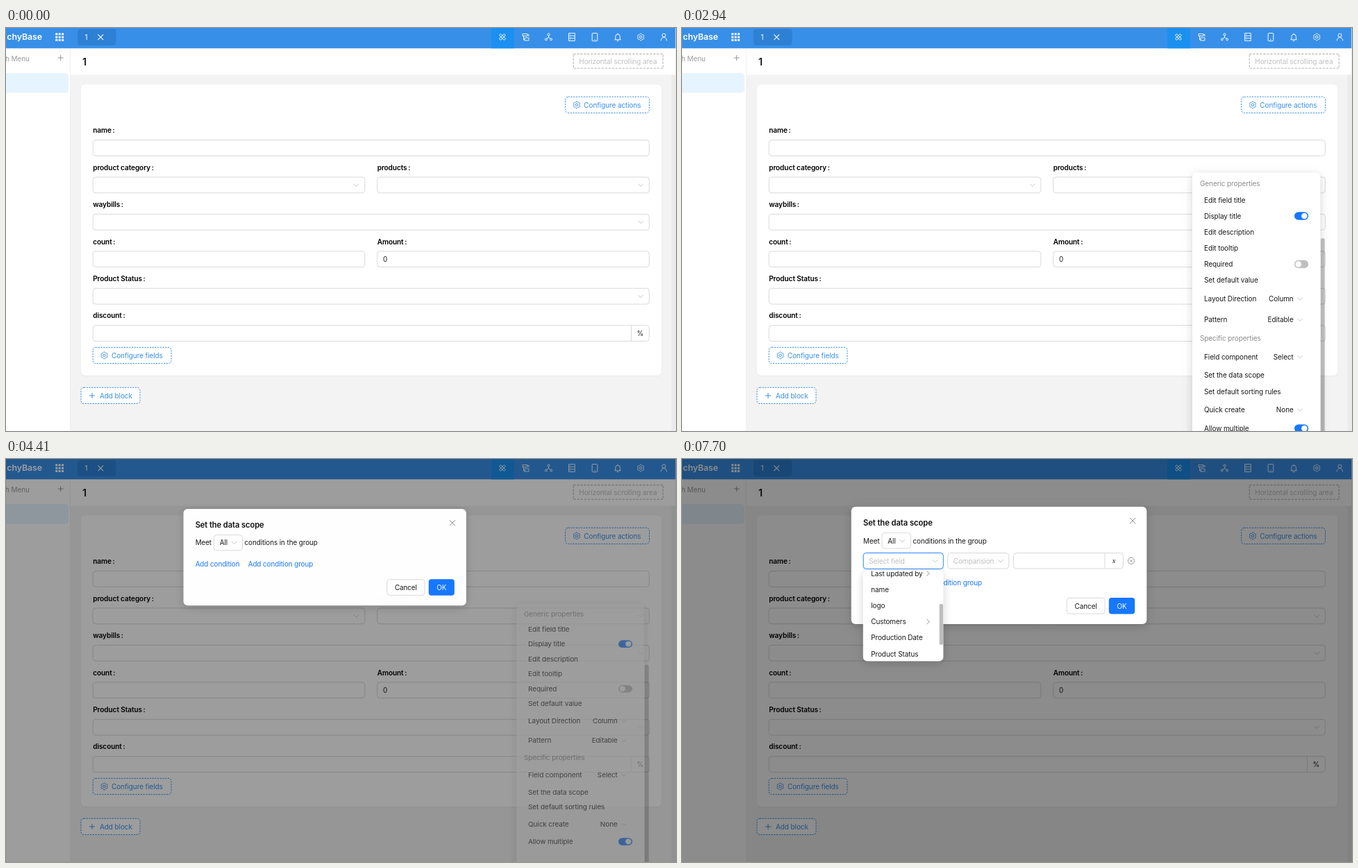
Animation, 965 px wide and 581 px high, one loop 8000 ms. Source, as an HTML page:

```html
<!DOCTYPE html>
<html lang="en">
<head>
<meta charset="utf-8">
<title>Form block data scope</title>
<style>
  html, body { margin: 0; width: 100%; height: 100%; overflow: hidden; background: #fff; }
  svg { display: block; width: 965px; height: 581px; }
  text { font-family: Inter, "Open Sans", sans-serif; letter-spacing: -0.1px; white-space: pre; }
  .card { filter: drop-shadow(0 1px 1px rgba(0,0,0,.04)); }
  .popup { filter: drop-shadow(0 3px 6px rgba(0,0,0,.11)) drop-shadow(0 2px 8px rgba(0,0,0,.07)); }
</style>
</head>
<body>
<svg id="stage" viewBox="0 0 965 581" xmlns="http://www.w3.org/2000/svg"></svg>
<script>
const INK = '#1a1a1a', BLUE = '#388fe8', TAG = '#2490f5', LINE = '#d9d9d9',
      MUTE = '#bfbfbf', PRIMARY = '#1677ff', HOVER = '#f4f4f4';

// ---- drawing helpers: each returns SVG markup ----
const box = (x, y, w, h, fill, r = 0, more = '') =>
  `<rect x="${x}" y="${y}" width="${w}" height="${h}" rx="${r}" fill="${fill}" ${more}/>`;
const frame = (x, y, w, h, stroke = LINE, r = 4, fill = '#fff', more = '') =>
  box(x, y, w, h, fill, r, `stroke="${stroke}" ${more}`);
const line = (d, stroke, w = 1, more = '') =>
  `<path d="${d}" fill="none" stroke="${stroke}" stroke-width="${w}" ${more}/>`;
const ring = (x, y, r, stroke, w = 1) =>
  `<circle cx="${x}" cy="${y}" r="${r}" fill="none" stroke="${stroke}" stroke-width="${w}"/>`;
// y is the middle of the capitals
const text = (x, y, s, fill = INK, size = 10, more = '') =>
  `<text x="${x}" y="${(y + size * .36).toFixed(2)}" fill="${fill}" font-size="${size}" ${more}>${s}</text>`;
const group = (id, body, more = '') => `<g id="${id}" ${more}>${body}</g>`;

const down = (x, y, s = 3.6, c = MUTE) => line(`M${x - s} ${y - s / 2}l${s} ${s}l${s} ${-s}`, c, .9);
const right = (x, y) => line(`M${x - 2} ${y - 3.4}l4 3.4l-4 3.4`, '#8c8c8c', .9);
const cross = (x, y, s, c, w = 1) =>
  line(`M${x - s} ${y - s}l${2 * s} ${2 * s}m0 ${-2 * s}l${-2 * s} ${2 * s}`, c, w);
const plus = (x, y, s, c, w = 1) => line(`M${x - s} ${y}h${2 * s}M${x} ${y - s}v${2 * s}`, c, w);

function gear(x, y, c) {
  let d = '';
  for (let i = 0; i < 36; i++) {
    const a = i * Math.PI / 18, r = 4.5 + .55 * Math.cos(6 * a);
    d += `${i ? 'L' : 'M'}${(x + r * Math.sin(a)).toFixed(2)} ${(y + r * Math.cos(a)).toFixed(2)}`;
  }
  return line(d + 'Z', c, .95) + ring(x, y, 1.8, c, .95);
}

function dashed(x, y, w, label, textX, icon) {
  return frame(x, y, w, 23.2, BLUE, 4, '#fff', 'stroke-dasharray="2.2 1.5"') +
    icon + text(textX, y + 11.7, label, BLUE);
}

// ---- page ----
function headerIcons() {
  const w = '#fff';
  const bar = a => `<rect x="-5" y="-1.5" width="10" height="3" rx=".7" fill="none" stroke="#fff"
    stroke-width=".9" transform="translate(715 13) rotate(${a})"/>`;
  return bar(45) + bar(-45) +
    line('M744 8.5h7v3h-7zM745.500 11.500v5.500h2M747 14h6v4h-6zM751 9.500h2v2.500', w, .9) +
    ring(781.5, 9.5, 1.6, w) + ring(777.8, 16.5, 1.4, w) + ring(785.2, 16.5, 1.4, w) +
    line('M781.500 11v3M778.500 15.300l3-1.600l3 1.600', w, .9) +
    line('M810.500 7.500h8.800v11h-8.800zM810.500 11.200h8.800M810.500 14.800h8.800M812.300 9.400h1M812.300 13h1M812.300 16.600h1', w, .9) +
    frame(844.2, 7.5, 7.6, 11.2, w, 1, 'none') + line('M847.300 16.600h1.400', w) +
    line('M876.600 16.800h9M877.800 16.600v-4a3.300 3.600 0 0 1 6.600 0v4M881.100 8.800v-1.300M879.900 18.600h2.400', w) +
    gear(914.3, 13, w) +
    ring(947.5, 10.5, 2.5, w) + line('M943.300 18.300a4.200 4.800 0 0 1 8.400 0', w);
}

function chrome() {
  let dots = '';
  for (let i = 0; i < 9; i++) dots += box(71.3 + i % 3 * 4.4, 7.3 + (i / 3 | 0) * 4.4, 3, 3, '#fff', .4);
  return box(0, 0, 965, 581, '#f3f3f3') + box(0, 29, 93, 552, '#fff') +
    box(93, 29, 872, 38.5, '#fff') + line('M92.500 29.500V581', '#f0f0f0') +
    box(958.5, 67.5, 6.5, 514, '#ebebeb') +
    box(0, 0, 965, 29.3, BLUE) + box(699, 0, 33, 29.3, '#1b90f1') +
    box(103, 1.5, 55.5, 23.5, '#2d80d4', 4) +
    text(52, 13, 'chyBase', '#fff', 12.4, 'font-weight="600" text-anchor="end"') + dots +
    text(113.5, 13, '1', '#fff') + cross(136.3, 13.2, 3.9, '#fff', 1.1) + headerIcons() +
    line('M964.500 0V67', '#e6e6e6', .8) +
    text(33.8, 44, 'h Menu', '#9c9c9c', 10, 'text-anchor="end"') + plus(78.7, 43, 4, '#8c8c8c', .9) +
    box(-8, 65, 98, 28.6, '#e6f4ff', 5) +
    text(110, 48.4, '1', INK, 14.5, 'font-weight="600"') +
    frame(817.3, 37.5, 129, 20.6, MUTE, 0, '#fff', 'stroke-width="1.3" stroke-dasharray="3.2 1.8"') +
    text(825.3, 47.9, 'Horizontal scrolling area', MUTE);
}

const LEFT = 125.2, MID = 534.7, HALF = 391.7, FULL = 801.2;
const rowY = i => 147.6 + i * 53.45;
const label = (x, i, s) => text(x, rowY(i), `${s}<tspan dx="1.600">:</tspan>`, '#000', 10.1, 'font-weight="600"');
function field(x, w, i, name, select) {
  const y = rowY(i);
  return label(x, i, name) + frame(x, y + 13.9, w, 22.8) +
    (select ? down(x + w - 12.3, y + 25.4) : '');
}

function form() {
  return box(108, 81.5, 836, 419.5, '#fff', 6, 'class="card"') +
    dashed(805.7, 99.2, 120.8, 'Configure actions', 832.3, gear(822, 110.8, BLUE)) +
    field(LEFT, FULL, 0, 'name') +
    field(LEFT, HALF, 1, 'product category', true) + field(MID, HALF, 1, 'products', true) +
    field(LEFT, FULL, 2, 'waybills', true) +
    field(LEFT, HALF, 3, 'count') + field(MID, HALF, 3, 'Amount') + text(543, 333.4, '0') +
    field(LEFT, FULL, 4, 'Product Status', true) +
    field(LEFT, FULL, 5, 'discount') + line('M900.500 428.900v22.500', LINE) +
    text(913.3, 440.2, '%', INK, 10, 'text-anchor="middle"') +
    dashed(125.2, 460.4, 112.8, 'Configure fields', 152, gear(141.5, 472, BLUE)) +
    dashed(108, 518.3, 85, 'Add block', 135, plus(124, 530, 4, BLUE));
}

// ---- designer overlays ----
const tile = (x, y) => box(x - 5.8, y - 5.8, 11.6, 11.6, TAG);
const burger = (x, y) => tile(x, y) +
  line(`M${x - 4} ${y - 3}h8m-8 3h8m-8 3h8`, '#fff', 1.1);
function tools(x, y) {
  return tile(x, y) + plus(x, y, 4, '#fff', .9) +
    line(`M${x - 1} ${y - 3.6}h2M${x - 1} ${y + 3.6}h2M${x - 3.6} ${y - 1}v2M${x + 3.6} ${y - 1}v2`, '#fff', .9) +
    tile(x + 13.7, y) + plus(x + 13.7, y, 3.8, '#fff', 1) + burger(x + 27.3, y);
}
const blockTools = () =>
  box(108.3, 82.3, 835.2, 418, 'none', 0, `stroke="${TAG}" stroke-opacity=".65"`) +
  box(110.5, 84.5, 26.5, 12, TAG) + text(112.8, 90.6, 'order', '#fff', 8.7) +
  tools(908, 90.3) + burger(957, 37);
const fieldTools = () => box(MID, 193.7, HALF, 44, '#1890ff', 3, 'fill-opacity=".06"') + tools(892, 200.4);

// ---- settings menu ----
const MENU = [
  ['Edit field title', 248], ['Display title', 271, true], ['Edit description', 294.2],
  ['Edit tooltip', 317.4], ['Required', 340.5, false], ['Set default value', 363.7],
  ['Layout Direction', 390.5, 'Column'], ['Pattern', 420.7, 'Editable'],
  ['Field component', 474, 'Select'], ['Set the data scope', 500.8],
  ['Set default sorting rules', 524], ['Quick create', 550.7, 'None'], ['Allow multiple', 577.3, true]
];
const toggle = (y, on) => box(882, y - 5.7, 20.2, 11.5, on ? PRIMARY : MUTE, 5.8) +
  `<circle cx="${on ? 896.4 : 887.800}" cy="${y}" r="4.300" fill="#fff"/>`;
function menu() {
  let s = box(735, 208.5, 184.3, 420, '#fff', 6, 'class="popup"') +
    box(920, 303, 5.8, 320, 'rgba(0,0,0,.24)', 3) + box(743, 0, 168, 23.2, HOVER, 3, 'id="pick"') +
    text(746, 224.8, 'Generic properties', '#8c8c8c') + text(746, 447.6, 'Specific properties', '#8c8c8c');
  for (const [name, y, extra] of MENU) {
    s += text(752, y, name);
    if (typeof extra === 'boolean') s += toggle(y, extra);
    if (typeof extra === 'string') s += text(880.7, y, extra, INK, 10, 'text-anchor="end"') + down(890, y, 3.4);
  }
  return s;
}

// ---- dialog ----
function dialog(x, w, bottom, body, first) {
  const r = x + w, l = x + 17.2, by = bottom - 37.7, ly = bottom - 60;
  return box(x, 68.7, w, bottom - 68.7, '#fff', 6, 'class="popup"') +
    text(l, 91.9, 'Set the data scope', '#111', 11.3, 'font-weight="600"') +
    cross(r - 20.2, 89, 4.1, '#8c8c8c') +
    text(l, 118, 'Meet') + frame(x + 44.2, 106.5, 41.3, 22.5) + text(x + 52.5, 118, 'All') +
    down(x + 73.4, 118) + text(x + 88.6, 118, 'conditions in the group') + body +
    text(l, ly, 'Add condition', PRIMARY, 10, `id="${first}"`) +
    text(x + 93.8, ly, 'Add condition group', PRIMARY) +
    frame(r - 115, by, 54.8, 22.8) + text(r - 87.6, by + 11.6, 'Cancel', INK, 10, 'text-anchor="middle"') +
    box(r - 54.5, by - .4, 37.4, 23.5, PRIMARY, 4) +
    text(r - 35.8, by + 11.6, 'OK', '#fff', 10, 'text-anchor="middle"');
}
const condition = () =>
  box(259.7, 133.9, 118.2, 26, '#0591ff', 5, 'id="glow" fill-opacity=".12"') +
  frame(261.3, 135.5, 115, 22.8, LINE, 4, '#fff', 'id="select"') +
  text(269.3, 147, 'Select field', MUTE) + down(364.5, 147) +
  frame(382.8, 135.5, 88, 22.5) + text(390.7, 147, 'Comparision', MUTE) + down(459, 147) +
  frame(477.4, 135.5, 158, 22.5) + line('M609 135.500v22.500', LINE) +
  `<text x="622" y="150" text-anchor="middle" font-size="10.500" fill="${INK}"
    style="font-family:'Liberation Serif',serif;font-style:italic">x</text>` +
  ring(647, 146.8, 4.6, '#8c8c8c', .9) + cross(647, 146.8, 1.7, '#8c8c8c', .9);

const OPTIONS = ['ID', 'Created at', 'Created by>', 'Last updated at', 'Last updated by>', 'name',
  'logo', 'Customers>', 'Production Date', 'Product Status'];
function dropdown() {
  let rows = '';
  OPTIONS.forEach((o, i) => {
    const y = 175.6 + i * 23.18;
    rows += text(272.2, y, o.replace('>', '')) + (o.endsWith('>') ? right(354.5, y) : '');
  });
  return box(260.8, 161, 115.6, 130.5, '#fff', 6, 'class="popup"') +
    box(264, 233.6, 103.6, 23.2, HOVER, 3, 'id="hover"') +
    `<g clip-path="url(#view)">${group('rows', rows)}</g>` +
    box(370.7, 162, 5.4, 59.2, 'rgba(0,0,0,.26)', 2.7, 'id="thumb"');
}

const stage = document.getElementById('stage');
stage.innerHTML = '<defs><clipPath id="view"><rect x="261" y="161.500" width="115" height="129.500"/></clipPath></defs>' +
  chrome() + form() + group('block', blockTools()) + group('field', fieldTools()) +
  group('menu', menu()) + box(0, 0, 965, 581, '#000', 0, 'id="mask"') +
  group('small', dialog(251.3, 410.3, 209, '', 'add')) +
  group('large', dialog(243.8, 425.5, 238, condition(), 'added')) + group('list', dropdown());

// ---- motion ----
const $ = Object.fromEntries([...stage.querySelectorAll('[id]')].map(e => [e.id, e]));
const set = (e, k, v) => e.setAttribute(k, v);
const show = (e, on) => set(e, 'visibility', on ? 'visible' : 'hidden');
const ramp = (t, from, ms) => Math.min(1, Math.max(0, (t - from) / ms));
const out = (k, n) => 1 - (1 - k) ** n;
const mix = (a, b, k) => `rgb(${a.map((v, i) => Math.round(v + (b[i] - v) * k))})`;
const within = (t, a, b) => t >= a && t < b;

function fadeSlide(e, top, k) {
  set(e, 'opacity', k);
  set(e, 'transform', `translate(0 ${top}) scale(1 ${.8 + .2 * k}) translate(0 ${-top})`);
}

// pointer passing over menu rows: [time, row middle]
const PASS = [[3080, 248], [3220, 271], [3290, 294.2], [3500, 390.5], [3570, 420.7], [3640, 474], [3780, 500.8]];

function draw(t) {
  show($.block, within(t, 1260, 2940));
  show($.field, within(t, 1260, 1750) || within(t, 2100, 2940));

  show($.menu, within(t, 2450, 4550));
  fadeSlide($.menu, 208.5, t < 4340 ? out(ramp(t, 2380, 140), 2) : 1 - ramp(t, 4340, 200));
  const at = PASS.filter(p => p[0] <= t).pop();
  set($.pick, 'opacity', at && t < 4340 ? 1 : 0);
  if (at) set($.pick, 'y', at[1] - 11.6);

  const open = t >= 4340, k = out(ramp(t, 4240, 300), 5.6), s = .2 + .8 * k;
  set($.mask, 'opacity', open ? .45 * ramp(t, 4240, 200) : 0);
  show($.small, within(t, 4340, 5670));
  set($.small, 'opacity', k);
  set($.small, 'transform', `translate(829 502) scale(${s}) translate(-829 -502)`);
  const plain = [22, 119, 255], lit = [105, 177, 255];
  set($.add, 'fill', mix(plain, lit, ramp(t, 5250, 280)));
  set($.added, 'fill', mix(lit, plain, ramp(t, 5600, 280)));

  show($.large, t >= 5670);
  set($.select, 'stroke', t >= 6160 ? '#3d90ff' : LINE);
  show($.glow, t >= 6230);

  show($.list, t >= 6370);
  fadeSlide($.list, 161, out(ramp(t, 6300, 210), 2));
  set($.hover, 'opacity', within(t, 6650, 6930) ? 1 : 0);
  const y = 50 * out(ramp(t, 6860, 350), 2) + 53.3 * out(ramp(t, 7350, 350), 2);
  set($.rows, 'transform', `translate(0 ${-y})`);
  set($.thumb, 'y', 162 + y * .452);
}

const TICK = 70, LOOP = 8000, start = performance.now();
function loop() {
  const t = (performance.now() - start + .5) % LOOP;
  draw(Math.floor(t / TICK) * TICK);
  requestAnimationFrame(loop);
}
loop();
</script>
</body>
</html>
```
